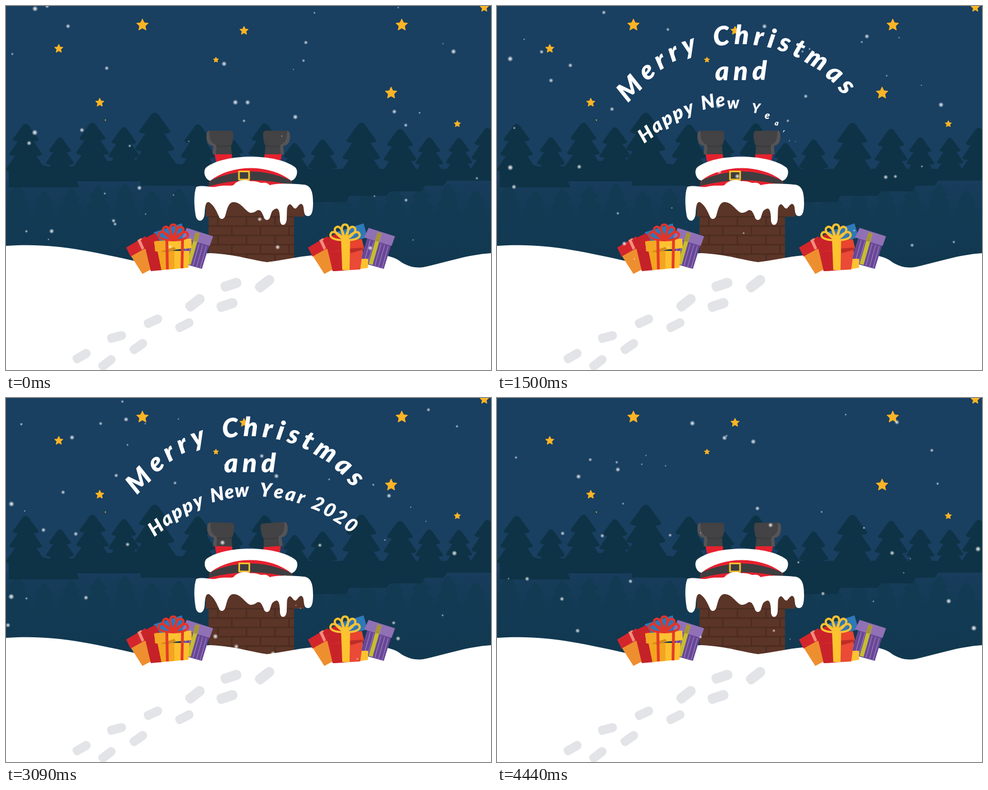
Recreate the animation shown at these times as an HTML page with a canvas. Size 864 by 648 pixels, loop 4470 ms.

```html
<!DOCTYPE html>
<html lang="en">
<head>
<meta charset="utf-8">
<title>Winter greeting</title>
<style>
html, body { margin: 0; width: 100%; height: 100%; overflow: hidden; background: #193f61; }
canvas { display: block; width: 864px; height: 648px; }
</style>
</head>
<body>
<canvas id="stage" width="864" height="648"></canvas>
<script>
const ctx = document.getElementById('stage').getContext('2d');
const LOOP = 4470, RAD = Math.PI / 180;
const clamp = (v, lo = 0, hi = 1) => Math.min(hi, Math.max(lo, v));

function seeded(seed) {
  return () => {
    seed = (seed * 1664525 + 1013904223) >>> 0;
    return seed / 4294967296;
  };
}

function fill(d, color) {
  ctx.fillStyle = color;
  ctx.fill(new Path2D(d));
}

function line(d, color, width) {
  ctx.strokeStyle = color;
  ctx.lineWidth = width;
  ctx.stroke(new Path2D(d));
}

function turned(x, y, degrees, draw) {
  ctx.save();
  ctx.translate(x, y);
  ctx.rotate(degrees * RAD);
  ctx.translate(-x, -y);
  draw();
  ctx.restore();
}

// Smooth interpolation through [time, value] pairs
function track(keys, t) {
  const i = Math.max(1, keys.findIndex(k => k[0] >= t));
  const [t0, a] = keys[i - 1], [t1, b] = keys[i];
  const p = clamp((t - t0) / (t1 - t0));
  return a + (b - a) * (1 - Math.cos(p * Math.PI)) / 2;
}

// ---- forest and sky ----
const TREES = [[35, 210, 1], [96, 234, .85], [154, 208, 1], [210, 216, .95], [265, 190, 1.2],
  [342, 211, 1.05], [404, 238, .8], [461, 209, 1], [514, 244, .85], [564, 238, .9], [633, 208, 1.15],
  [702, 219, 1], [754, 234, .85], [807, 235, .8], [858, 217, 1]];

function tree(x, top, s) {
  const at = (dx, dy) => `${x + dx * s} ${top + dy * s}`;
  const side = k => `M${x} ${top}Q${at(k * 4, 0)} ${at(k * 7, 5)}L${at(k * 23, 27)}
    Q${at(k * 23, 31)} ${at(k * 14, 31)}L${at(k * 29, 53)}Q${at(k * 29, 57)} ${at(k * 19, 57)}
    L${at(k * 36, 82)}L${at(0, 92)}Z`;
  return side(1) + side(-1);
}

const backTrees = TREES.map(t => tree(...t)).join('');
const frontTrees = Array.from({ length: 19 }, (_, i) =>
  tree(20 + i * 48, 317 + (i * 7 % 4) * 4, .7)).join('');

function drawForest() {
  ctx.fillStyle = '#193f61';
  ctx.fillRect(0, 0, 864, 648);
  const low = ctx.createLinearGradient(0, 310, 0, 460);
  low.addColorStop(0, '#183d5d');
  low.addColorStop(.35, '#143b56');
  low.addColorStop(1, '#11384f');
  ctx.fillStyle = low;
  ctx.fillRect(0, 310, 864, 160);
  fill(frontTrees, '#133a53');
  fill(backTrees, '#0e3346');
  fill(`M5 290L40 276L96 292L150 276H265L345 286L520 290H864V311H786L780 320H746L740 330H684
    L678 338H612L605 349H520L332 320H240V312H126L131 323H5Z`, '#0e3346');
}

const STARS = [[243, 34, 11], [424, 44, 8], [94, 76, 8], [374, 96, 5], [167, 172, 8],
  [705, 34, 11], [686, 155, 11], [804, 210, 6], [852, 3, 8], [177, 203, 1]];

function drawStar(x, y, r) {
  ctx.beginPath();
  for (let i = 0; i < 10; i++) {
    const a = i * 36 * RAD, d = i % 2 ? r * .48 : r;
    ctx.lineTo(x + d * Math.sin(a), y - d * Math.cos(a));
  }
  ctx.closePath();
  ctx.fillStyle = ctx.strokeStyle = '#fcb424';
  ctx.lineWidth = 1;
  ctx.lineJoin = 'round';
  ctx.fill();
  ctx.stroke();
}

// ---- chimney and legs ----
function drawChimney() {
  ctx.fillStyle = '#5b3527';
  ctx.fillRect(356, 335, 175, 40);
  ctx.fillRect(361, 370, 152, 90);
  ctx.fillStyle = '#4b2c21';
  for (let row = 0; row < 6; row++) {
    const y = 374 + row * 16.6;
    ctx.fillRect(361, y, 152, 2.5);
    for (let x = row % 2 ? 401 : 376; x < 513; x += 51) ctx.fillRect(x, y, 2.5, 16.6);
  }
}

function drawLeg() {
  fill('M371 262H402L406 294H378Z', '#e6212f');
  fill(`M362 222H401Q406 223 405 232Q404 244 401 249L402 264H368L369 249
    C360 249 356 240 357 230Q357 223 362 222Z`, '#434244');
  fill('M362 222Q357 223 357 231C357 241 360 248 369 249L368 264H374L375 248Q364 243 363 233Z', '#555456');
  line('M374 249Q388 252 401 248', '#39383a', 1.5);
}

const LEFT_LEG = [[0, 0], [930, 6], [1500, 0], [2100, 4.5], [3090, 1.5], [3900, 3], [4440, 0], [4470, 0]];
const RIGHT_LEG = [[0, 0], [930, 2], [1500, -1], [2100, -3], [3090, -4.3], [3900, -5], [4440, 0], [4470, 0]];

function drawBody(t) {
  const left = track(LEFT_LEG, t), right = track(RIGHT_LEG, t);
  turned(388, 290, left, drawLeg);
  turned(480, 290, right, () => {
    ctx.translate(863, 0);
    ctx.scale(-1, 1);
    drawLeg();
  });
  turned(436, 340, -right * .15, () => {
    fill('M366 300Q436 266 506 300L513 330H359Z', '#e6212f');
    fill('M365 310Q436 279 507 310L512 320Q436 300 361 321Z', '#3e3d3f');
    line('M415 294.5H433V309H415Z', '#f2c12e', 3);
    fill(`M364 311C354 309 350 293 357 287C390 262 482 262 515 287
      C522 293 518 309 508 311C470 281 402 281 364 311Z`, '#fff');
  });
}

function drawSnowCap() {
  fill(`M339 322C351 318 361 323 373 322C387 318 397 321 405 319C413 309 427 308 436 312
    C446 311 452 315 456 315C464 313 468 317 470 319C482 315 510 316 530 318C545 319 547 335 547 350
    C547 362 546 374 538 374C529 374 532 362 529 355C525 348 521 356 517 360C512 363 510 352 505 353
    C499 356 501 365 500 380C499 393 488 393 488 380C488 368 486 358 480 361C473 364 473 368 471 374
    C469 383 461 383 459 375C456 366 452 361 447 364C442 368 436 370 431 366C423 360 418 350 406 349
    C396 349 394 362 391 372C389 381 381 381 379 374C375 365 371 356 363 350C356 346 355 356 354 366
    C354 386 341 386 338 374C335 356 334 335 339 322Z`, '#fff');
}

// ---- ground ----
const STEPS = [[401, 496, -18], [461, 494, -38], [337, 528, -38], [394, 532, -18], [262, 561, -25],
  [318, 568, -27], [197, 589, -15], [236, 606, -35], [135, 623, -30], [180, 635, -38]];

function drawGround() {
  fill(`M0 427C90 421 150 437 235 455C290 452 320 440 365 440C410 442 440 453 465 456
    C490 453 520 446 545 444C620 432 680 440 700 453C715 464 730 468 748 464
    C785 456 820 443 864 440V648H0Z`, '#fff');
  STEPS.forEach(([x, y, angle], i) => turned(x, y, angle, () => {
    const w = i < 4 ? 38 : 34, h = i < 4 ? 18 : 16;
    ctx.beginPath();
    ctx.roundRect(x - w / 2, y - h / 2, w, h, [7, 9, 9, 7]);
    ctx.fillStyle = '#e3e4e8';
    ctx.fill();
  }));
}

// ---- presents ----
function drawPresents(dx, front) {
  ctx.save();
  ctx.translate(dx, 0);
  fill('M263 403L313 387L320 412L270 424Z', '#2f78b7');
  fill('M222 444L250 428L264 466L243 477Z', '#ee8f2f');
  fill('M214 430L248 410L258 426L222 446Z', '#d3262c');
  fill('M234 417L241 413L247 431L242 434Z', '#f58d7c');
  fill('M248 430L272 418L280 470L258 472Z', '#c52128');
  fill('M240 417L266 404L274 418L247 433Z', '#c9232a');

  fill('M320 412L362 426L349 468L306 456Z', '#684796');
  for (let i = 0; i < 6; i++) {
    const x = 325 + i * 6.4, y = 417 + i * 2.1;
    line(`M${x} ${y}l-11 39`, '#9a7cbd', 1.3);
  }
  fill('M322 395L369 410L363 427L314 412Z', '#9171b5');
  fill('M338 403L345 405L329 461L322 459Z', '#c5bd30');
  fill('M338 403L345 405L340 420L333 418Z', '#a69535');

  if (front === 'yellow') {
    fill('M270 436H327L325 466L277 470Z', '#fdbf2d');
    fill('M270 436H300V468L277 470Z', '#f3a51f');
    fill('M264 419L330 414L331 431L266 437Z', '#fdc231');
    fill('M264 419L288 417V435L266 437Z', '#f5a623');
    fill('M275 437L300 429L303 434L286 439Z', '#d58a1d');
    fill('M284 418H289L290 469H285ZM312 415H317L316 467H311Z', '#e53a29');
  } else {
    fill('M302 450H321V466L302 469Z', '#fdc231');
    fill('M250 432H312L307 469L258 472Z', '#ea4a36');
    fill('M250 432H278V471L258 472Z', '#c9232a');
    fill('M247 422L310 415L314 432L250 438Z', '#e9442f');
    fill('M247 422L276 418V435L250 438Z', '#c9232a');
    fill('M288 432L312 430L311 434L290 440Z', '#bd2c28');
    fill('M273 418H289L288 470H275Z', '#fdc42f');
  }
  drawBow(front === 'yellow' ? 298 : 280, front === 'yellow' ? '#e3342a' : '#fdc231');
  ctx.restore();
}

function drawBow(x, color) {
  for (const angle of [-66, -35, 0, 35, 66]) {
    turned(x, 417, angle, () =>
      line(`M${x} 417C${x - 9} 397 ${x - 6} 389 ${x} 389S${x + 9} 397 ${x} 417`, color, 3.8));
  }
  ctx.fillStyle = color;
  ctx.fillRect(x - 5, 412, 10, 6);
}

// ---- falling snow ----
const rand = seeded(2411);
const FLAKES = Array.from({ length: 48 }, () => ({
  x: rand() * 864, y: rand() * 490, r: 1.5 + rand() * 4,
  fall: .04 + rand() * .05, drift: (rand() - .5) * .03, phase: rand() * 6.28
}));

function drawFlakes(t) {
  for (const f of FLAKES) {
    const x = (f.x + f.drift * t + 5 * Math.sin(f.phase + t / 700) + 864) % 864;
    const y = (f.y + f.fall * t) % 490 - 6;
    const glow = ctx.createRadialGradient(x, y, 0, x, y, f.r);
    const alpha = .4 + f.r * .1;
    glow.addColorStop(0, `rgba(255,255,255,${alpha})`);
    glow.addColorStop(.4, `rgba(255,255,255,${alpha * .7})`);
    glow.addColorStop(1, 'rgba(255,255,255,0)');
    ctx.fillStyle = glow;
    ctx.fillRect(x - f.r, y - f.r, f.r * 2, f.r * 2);
  }
}

// ---- greeting: words spread between two angles of a circle ----
const LINES = [
  { x: 432, y: 302, r: 234, size: 47, start: 100, step: 45, time: 280,
    words: [['Merry', -52, -21.5], ['Christmas', -7.6, 50.6]] },
  { x: 436, y: 2132, r: 2000, size: 47, start: 690, step: 110, time: 240,
    words: [['and', -1, .9]] },
  { x: 443, y: 428, r: 253, size: 34, start: 944, step: 45, time: 280,
    words: [['Happy', -42, -22.6], ['New', -14.8, -5], ['Year', 4.3, 18.4], ['2020', 25.4, 40.6]] }
];

function layout(line) {
  ctx.font = line.font = `italic 900 ${line.size}px Lato, sans-serif`;
  line.letters = line.words.flatMap(([word, from, to]) => {
    const widths = [...word].map(c => ctx.measureText(c).width);
    const n = widths.length;
    const natural = widths.reduce((a, b) => a + b) - (widths[0] + widths[n - 1]) / 2;
    const gap = ((to - from) * RAD * line.r - natural) / (n - 1);
    let at = 0;
    return [...word].map((char, i) => {
      if (i) at += (widths[i - 1] + widths[i]) / 2 + gap;
      return { char, angle: from * RAD + at / line.r };
    });
  });
}

function drawGreeting(t) {
  ctx.save();
  ctx.globalAlpha = 1 - clamp((t - 4100) / 250);
  ctx.fillStyle = '#fff';
  ctx.textAlign = 'center';
  for (const line of LINES) {
    ctx.font = line.font;
    line.letters.forEach(({ char, angle }, i) => {
      const age = (t - line.start - i * line.step) / line.time;
      if (age <= 0) return;
      const p = Math.min(age, 1);
      const lift = 3 * Math.sin(Math.PI * clamp((age - 1) / 1.6));
      const r = line.r - 50 * (1 - p) + lift;
      ctx.save();
      ctx.translate(line.x + r * Math.sin(angle), line.y - r * Math.cos(angle));
      ctx.rotate(angle * .88);
      ctx.scale(p, p);
      ctx.fillText(char, 0, 0);
      ctx.restore();
    });
  }
  ctx.restore();
}

LINES.forEach(layout);
const begin = performance.now();

function frame() {
  const t = (performance.now() - begin) % LOOP;
  drawForest();
  STARS.forEach(s => drawStar(...s));
  drawChimney();
  drawBody(t);
  drawSnowCap();
  drawGround();
  drawPresents(0, 'yellow');
  drawPresents(324, 'red');
  drawFlakes(t);
  drawGreeting(t);
  requestAnimationFrame(frame);
}
frame();
</script>
</body>
</html>
```
